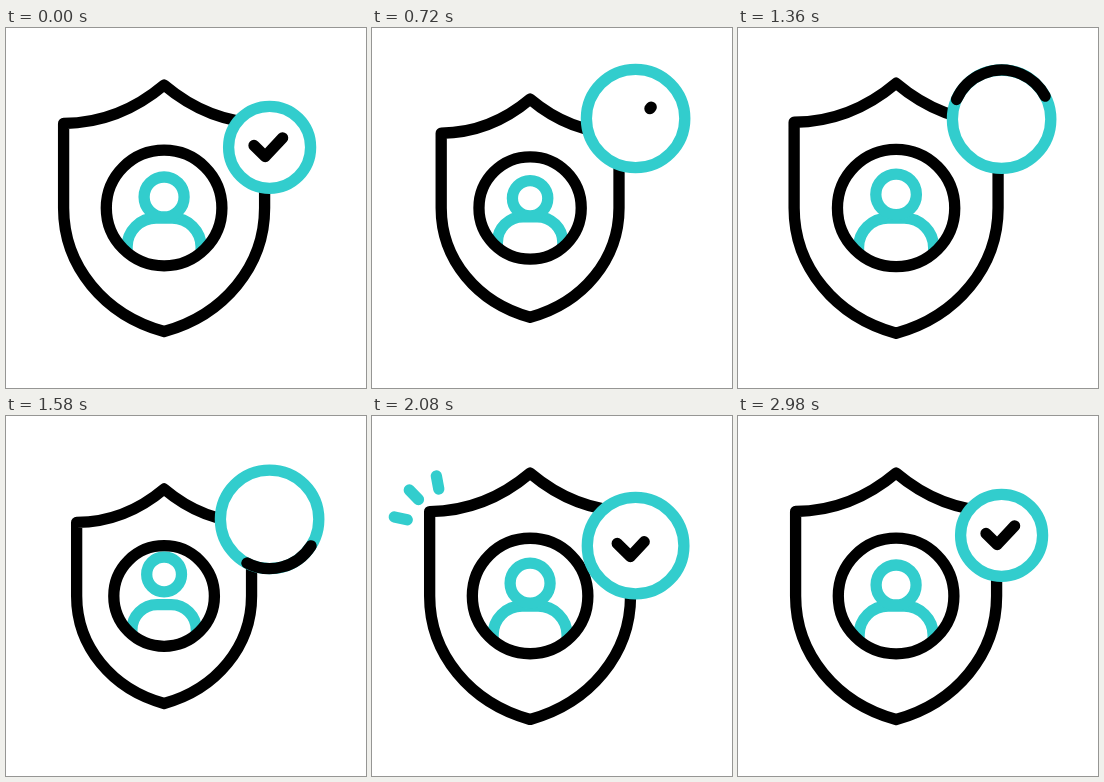
These frames come from a looping animation (360x360 px, 3 s). An HTML page with a canvas:

```html
<!DOCTYPE html>
<html lang="en">
<head>
<meta charset="utf-8">
<title>Account protection</title>
<style>
  html, body { margin: 0; width: 100%; height: 100%; overflow: hidden; background: #fff; }
  canvas { display: block; width: 360px; height: 360px; }
</style>
</head>
<body>
<canvas id="stage"></canvas>
<script>
const LOOP = 3000, BLACK = '#000', TEAL = '#32cdcd', LINE = 11.3, TAU = Math.PI * 2;
const canvas = document.getElementById('stage');
const ctx = canvas.getContext('2d');
const ratio = window.devicePixelRatio || 1;
canvas.width = canvas.height = 360 * ratio;

const clamp = x => Math.min(1, Math.max(0, x));
const phase = (t, a, b) => clamp((t - a) / (b - a));
const ease = u => (1 - Math.cos(Math.PI * u)) / 2;
const glide = (t, a, b) => ease(phase(t, a, b));

// Eased value through a list of [time, value] keys
function track(t, keys) {
  let v = keys[0][1];
  for (let i = 1; i < keys.length; i++) {
    v += (keys[i][1] - keys[i - 1][1]) * glide(t, keys[i - 1][0], keys[i][0]);
  }
  return v;
}

const shieldSize = [[215, 1], [585, .868], [1270, 1.045], [1605, .868], [2100, 1]];
const headLift = [[1270, 0], [1605, -14], [2230, 0]];
const badgeY = [[200, 119.3], [705, 90.5], [1300, 90.5], [2030, 130.3], [2360, 119.3]];
const badgeR = [[200, 41], [590, 49.2], [2005, 49.2], [2360, 41]];

// Scales the geometry but keeps the line weight
function shape(x, y, s, build) {
  ctx.save();
  ctx.translate(x, y);
  ctx.scale(s, s);
  ctx.beginPath();
  build();
  ctx.restore();
}

function stroke(color) {
  ctx.strokeStyle = color;
  ctx.stroke();
}

function disc(x, y, r) {
  ctx.beginPath();
  ctx.arc(x, y, r, 0, TAU);
}

function shieldPath() {
  ctx.moveTo(0, -123);
  ctx.quadraticCurveTo(-45, -85, -100.5, -84.5);
  ctx.lineTo(-100.5, 0);
  ctx.bezierCurveTo(-100.5, 58, -60, 107, 0, 123.5);
  ctx.bezierCurveTo(60, 107, 100.5, 58, 100.5, 0);
  ctx.lineTo(100.5, -84.5);
  ctx.quadraticCurveTo(45, -85, 0, -123);
  ctx.closePath();
}

function bodyPath() {
  ctx.moveTo(-37, 50);
  ctx.lineTo(-37, 39);
  ctx.arc(-8, 39, 29, Math.PI, Math.PI * 1.5);
  ctx.arc(8, 39, 29, -Math.PI / 2, 0);
  ctx.lineTo(37, 50);
}

function drawRays(t) {
  const near = 30 + 40 * glide(t, 1800, 2660);
  const far = 30 + 40 * glide(t, 1800, 2315);
  if (far - near < .05) return;
  for (const deg of [192, 226, 259.5]) {
    const a = deg * Math.PI / 180, c = Math.cos(a), s = Math.sin(a);
    ctx.beginPath();
    ctx.moveTo(74 + near * c, 112 + near * s);
    ctx.lineTo(74 + far * c, 112 + far * s);
    stroke(TEAL);
  }
}

function drawShield(t) {
  const x = 158.1, y = 180, s = track(t, shieldSize), ring = 57.8 * s;
  shape(x, y, s, shieldPath);
  stroke(BLACK);

  ctx.save();
  disc(x, y, ring);
  ctx.clip();
  shape(x, y, s, bodyPath);
  stroke(TEAL);
  disc(x, y + (track(t, headLift) - 11) * s, 20 * s);
  stroke(TEAL);
  ctx.restore();

  disc(x, y, ring);
  stroke(BLACK);
}

// Part of the tick between two fractions of its length
function drawTick(x, y, s, from, to) {
  if (to - from < .002) return;
  const pts = [[-15.6, -1.9], [-4.4, 9.2], [13, -9.4]], bend = .385;
  const at = f => {
    const i = f < bend ? 0 : 1;
    const u = i ? (f - bend) / (1 - bend) : f / bend;
    return [0, 1].map(k => pts[i][k] + (pts[i + 1][k] - pts[i][k]) * u);
  };
  shape(x, y, s, () => {
    ctx.moveTo(...at(from));
    if (from < bend && to > bend) ctx.lineTo(...pts[1]);
    ctx.lineTo(...at(to));
  });
  stroke(BLACK);
}

function drawBadge(t) {
  const x = 263.6, y = track(t, badgeY), r = track(t, badgeR);
  disc(x, y, r);
  ctx.fillStyle = '#fff';
  ctx.fill();
  stroke(TEAL);

  const spin = phase(t, 722, 1812);
  if (spin > 0 && spin < 1) {
    const top = -Math.PI / 2, turns = 2 * TAU;
    ctx.beginPath();
    ctx.arc(x, y, r, top + turns * Math.pow(spin, 1.68), top + turns * spin);
    stroke(BLACK);
  }

  if (t < 1000) drawTick(x, y, r / 41, glide(t, 430, 762), 1);
  else drawTick(x, y, r / 41, 0, glide(t, 1810, 2195));
}

function draw(t) {
  ctx.setTransform(ratio, 0, 0, ratio, 0, 0);
  ctx.fillStyle = '#fff';
  ctx.fillRect(0, 0, 360, 360);
  ctx.lineWidth = LINE;
  ctx.lineCap = ctx.lineJoin = 'round';
  drawRays(t);
  drawShield(t);
  drawBadge(t);
}

const start = performance.now();
function tick() {
  draw((performance.now() - start) % LOOP);
  requestAnimationFrame(tick);
}
draw(0);
requestAnimationFrame(tick);
</script>
</body>
</html>
```
